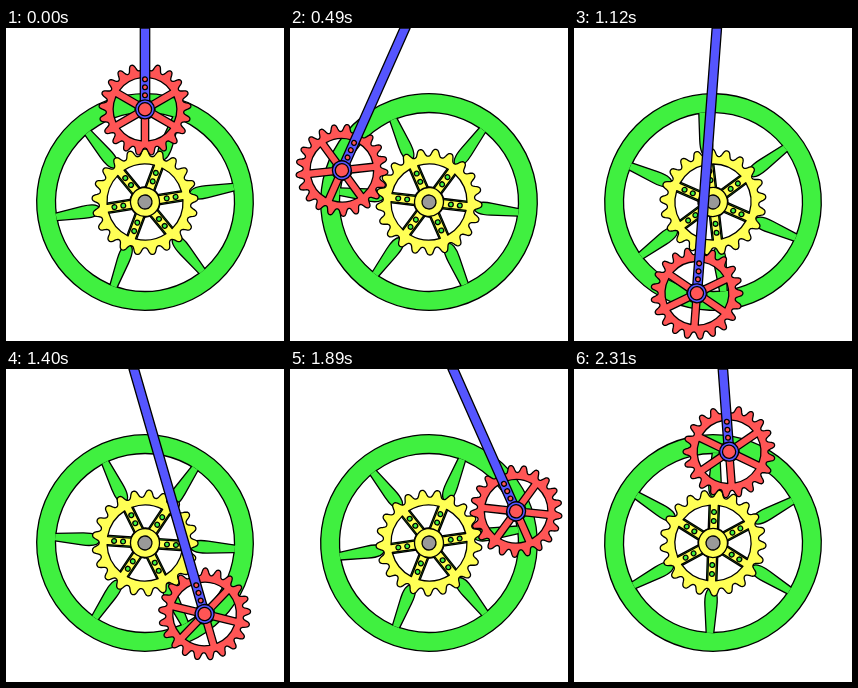
Write an HTML page that moves like this. It is 278 by 313 pixels and loops after 2.38 s.

```html
<!DOCTYPE html>
<html lang="en">
<head>
<meta charset="utf-8">
<title>Sun and planet gear</title>
<style>
html, body { margin: 0; width: 100%; height: 100%; overflow: hidden; background: #fff; }
svg { display: block; width: 278px; height: 313px; }
svg * { stroke: #000; stroke-width: 1.3; stroke-linejoin: round; }
.green { fill: #40f040; }
.yellow { fill: #ffff55; }
.red { fill: #ff5555; }
.blue { fill: #5555ff; }
.white { fill: #fff; }
.grey { fill: #999; }
</style>
</head>
<body>
<svg id="stage" viewBox="0 0 278 313"></svg>
<script>
const CX = 139, CY = 174, ORBIT = 92.7, ROD = 215;
const STEP = 70, STEPS = 34, TEETH = 21, START = 9.5;
const RAD = Math.PI / 180;
const stage = document.getElementById('stage');

function add(parent, tag, attrs = {}) {
  const el = document.createElementNS('http://www.w3.org/2000/svg', tag);
  for (const key in attrs) el.setAttribute(key, attrs[key]);
  parent.appendChild(el);
  return el;
}

const circle = (parent, r, color, cx = 0, cy = 0) =>
  add(parent, 'circle', { cx, cy, r, class: color });

const polar = (r, a) => (r * Math.cos(a)).toFixed(2) + ' ' + (r * Math.sin(a)).toFixed(2);

// Rounded teeth, with one tip at the given angle
function toothed(mid, height, tip) {
  const pts = [], count = TEETH * 18;
  for (let i = 0; i < count; i++) {
    const a = i / count * 2 * Math.PI;
    const wave = Math.tanh(1.2 * Math.cos(TEETH * a)) / Math.tanh(1.2);
    pts.push(polar(mid + height * wave, a + tip * RAD));
  }
  return 'M' + pts.join('L') + 'Z';
}

// Six openings between spokes of the given half width
function openings(inner, outer, half, turn) {
  let d = '';
  for (let i = 0; i < 6; i++) {
    const a = (turn + i * 60) * RAD, b = a + 60 * RAD;
    const ai = Math.asin(half / inner), ao = Math.asin(half / outer);
    d += `M${polar(inner, a + ai)}L${polar(outer, a + ao)}` +
         `A${outer} ${outer} 0 0 1 ${polar(outer, b - ao)}` +
         `L${polar(inner, b - ai)}A${inner} ${inner} 0 0 0 ${polar(inner, a + ai)}Z`;
  }
  return d;
}

// Flywheel
const wheel = add(stage, 'g');
circle(wheel, 108.3, 'green');
circle(wheel, 89.5, 'white');
for (let i = 0; i < 6; i++) {
  add(wheel, 'path', {
    class: 'green',
    d: 'M10 -5.2H43V5.2H10Z' +
       'M90 -3.8L63 -6C53 -6.8 46 -6 45 0C46 6 53 6.8 63 6L90 3.8',
    transform: `rotate(${i * 60})`
  });
}

// Sun gear, fixed to the flywheel
add(wheel, 'path', {
  class: 'yellow',
  'fill-rule': 'evenodd',
  d: toothed(49.4, 3.6, START - 90) + openings(15, 38, 4, 0)
});
for (let i = 0; i < 6; i++) {
  const arm = add(wheel, 'g', { transform: `rotate(${i * 60})` });
  circle(arm, 2.4, 'green', 22, 0);
  circle(arm, 2.4, 'green', 31, 0);
}
circle(wheel, 14.5, 'yellow');
circle(wheel, 7, 'grey');

// Planet gear, fixed to the rod
const planet = add(stage, 'g');
add(planet, 'path', {
  class: 'red',
  'fill-rule': 'evenodd',
  d: toothed(42.4, 3.6, -90) + openings(10, 31.8, 3.7, 30)
});
const rod = add(stage, 'path', { class: 'blue' });
const joint = add(stage, 'g');
for (const y of [-30, -22, -14]) circle(joint, 2.4, 'red', 0, y);
circle(joint, 9.5, 'blue');
circle(joint, 6.6, 'red');

function pose(k) {
  // The orbit skips ten degrees twice in the lower half;
  // at the first skip the flywheel slips by one tooth
  const late = k > 15;
  const orbit = 10 * (k + late + (k > 18));
  const x = CX - ORBIT * Math.sin(orbit * RAD);
  const y = CY - ORBIT * Math.cos(orbit * RAD);
  const lean = Math.asin((CX - x) / ROD);
  const tilt = lean / RAD;
  const spin = START + 2 * orbit + tilt - (late ? 360 / TEETH : 0);

  wheel.setAttribute('transform', `translate(${CX} ${CY}) rotate(${-spin})`);
  const place = `translate(${x} ${y}) rotate(${tilt})`;
  planet.setAttribute('transform', place);
  joint.setAttribute('transform', place);

  const top = x + y * Math.tan(lean), half = 4.7 / Math.cos(lean);
  rod.setAttribute('d',
    `M${x - half} ${y}L${top - half} 0.2H${top + half}L${x + half} ${y}Z`);
}

const start = performance.now();
function tick() {
  const t = Math.max(0, performance.now() - start);
  pose(Math.floor(t / STEP) % STEPS);
  requestAnimationFrame(tick);
}
pose(0);
requestAnimationFrame(tick);
</script>
</body>
</html>
```
